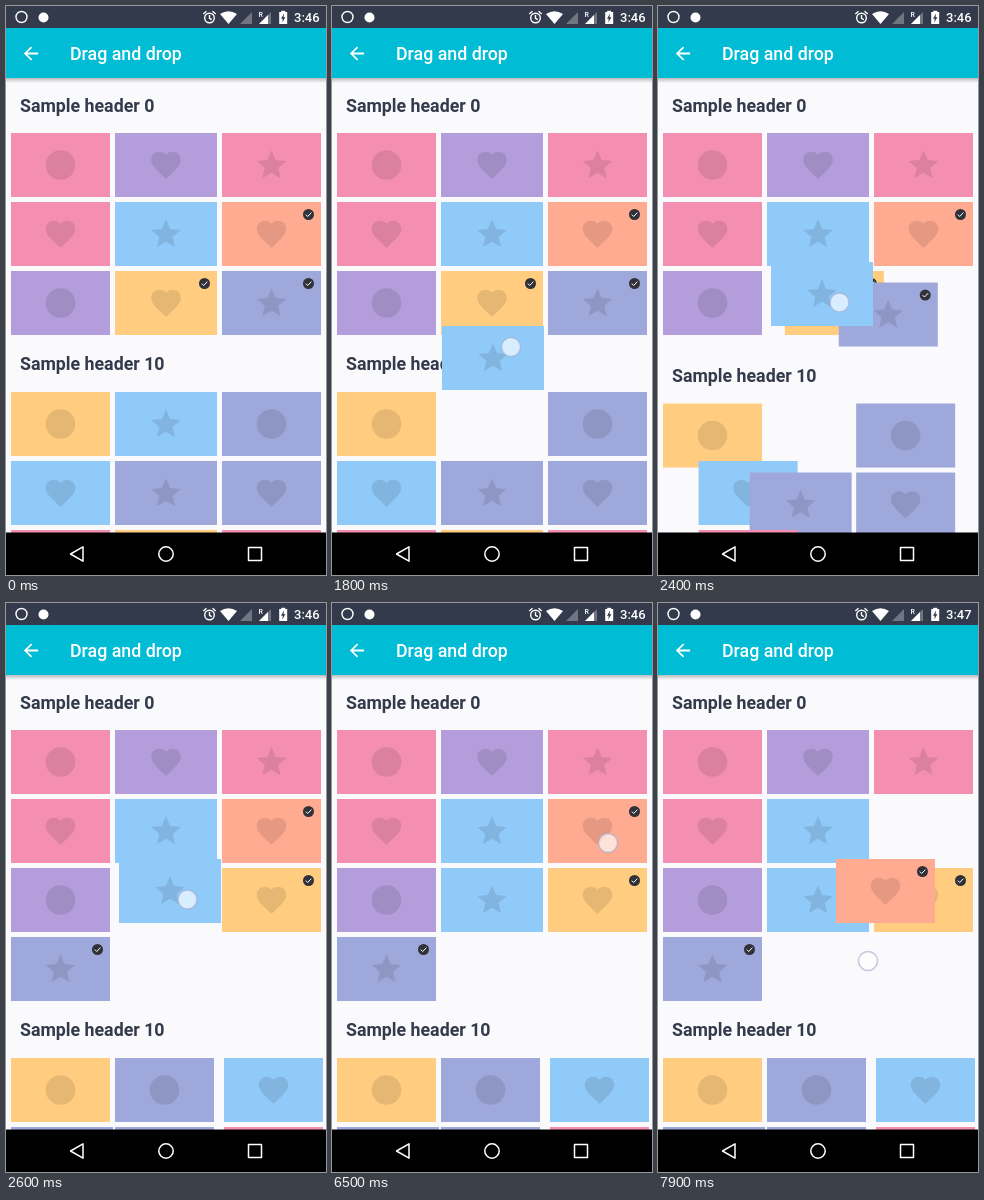
An HTML page with a canvas that plays this animation: 320 px wide and 569 px high, repeating every 8 s.

```html
<!DOCTYPE html>
<html lang="en">
<head>
<meta charset="utf-8">
<title>Drag and drop</title>
<style>
html, body { margin: 0; width: 100%; height: 100%; overflow: hidden; background: #000; }
canvas { display: block; width: 320px; height: 569px; }
</style>
</head>
<body>
<canvas id="stage"></canvas>
<script>
const W = 320, H = 569, LOOP = 8000, STEP = 100;
const canvas = document.getElementById('stage');
const ctx = canvas.getContext('2d');
const ratio = window.devicePixelRatio || 1;
canvas.width = W * ratio;
canvas.height = H * ratio;

const INK = '#333a4b', PAPER = '#faf9fc', BAR = '#00bcd4';
const COLORS = { p: '#f48fb1', v: '#b39ddb', b: '#90caf9', d: '#ffab91', o: '#ffcc80', i: '#9fa8da' };
const COLS = [5, 109, 216], WIDTHS = [99, 102, 99];
const ROW = 69, TILE_H = 64;

const heart = new Path2D('M12 21.35l-1.45-1.32C5.4 15.36 2 12.28 2 8.5 2 5.42 4.42 3 7.5 3c1.74 0 3.41.81 4.5 2.09C13.09 3.81 14.76 3 16.5 3 19.58 3 22 5.42 22 8.5c0 3.78-3.4 6.86-8.55 11.54z');
const star = new Path2D('M12 17.27L18.18 21l-1.64-7.03L22 9.24l-7.19-.61L12 2 9.19 8.63 2 9.24l5.46 4.73L5.82 21z');
const disc = new Path2D();
disc.arc(12, 12, 10, 0, Math.PI * 2);
const SHAPES = { h: heart, s: star, c: disc };
const backArrow = new Path2D('M20 11H7.83l5.59-5.59L12 4l-8 8 8 8 1.41-1.41L7.83 13H20z');

// Paths are lists of [time, x, y].
const touchA = [[500, 177, 425], [1100, 177, 425], [1200, 177, 416], [1300, 177, 406],
  [1700, 178.5, 360], [1800, 179, 341], [2000, 180, 317], [2300, 181.5, 296], [2400, 181.5, 296.5]];
const tileA = [[1100, 109, 386], [1200, 109, 384], [1300, 109, 376], [1800, 110, 320],
  [1900, 110.5, 303], [2100, 112, 278], [2400, 113, 256]];
const touchB = [[7100, 276, 240], [7400, 270, 252], [7600, 256, 276], [7700, 246, 292],
  [7800, 230, 320], [7900, 210, 358]];
const tileB = [[7100, 216, 196], [7400, 214, 200], [7600, 206, 213], [7800, 188, 240], [7900, 178, 256]];

const clamp = v => Math.max(0, Math.min(1, v));
const mix = (a, b, k) => a + (b - a) * k;
const smooth = v => (1 - Math.cos(Math.PI * clamp(v))) / 2;

function along(keys, t) {
  let n = keys.findIndex(k => k[0] > t);
  if (n < 0) return keys[keys.length - 1].slice(1);
  n = Math.max(1, n);
  const [a, b] = [keys[n - 1], keys[n]];
  const k = clamp((t - a[0]) / (b[0] - a[0]));
  return [mix(a[1], b[1], k), mix(a[2], b[2], k)];
}

const slot = (i, top, cols = COLS) => [cols[i % 3], top + ROW * Math.floor(i / 3)];

function makeTile(code, i, to, from, width) {
  return { color: COLORS[code[0]], shape: SHAPES[code[1]], checked: code[2] === '+', from, to, width };
}

const first = 'pc vh ps ph bs dh+ vc oh+ is+'.split(' ').map((code, i) => {
  const j = i < 7 ? i : i + 1;
  return makeTile(code, i, slot(j, 127), slot(i, 127), [WIDTHS[i % 3], WIDTHS[j % 3]]);
});
const second = 'oc bs ic bh is ih pc oc pc'.split(' ').map((code, i) => {
  const w = WIDTHS[i % 3];
  return makeTile(code, i, slot(i > 1 ? i - 1 : i, 455, [5, 109, 218]), slot(i, 386), [w, w]);
});
const moved = second[1];
moved.to = slot(7, 127);
const picked = first[5];

function circle(x, y, r) {
  ctx.beginPath();
  ctx.arc(x, y, r, 0, Math.PI * 2);
}

function line(points, close) {
  ctx.beginPath();
  points.forEach(([x, y]) => ctx.lineTo(x, y));
  if (close) ctx.closePath();
}

function icon(path, x, y, scale) {
  ctx.save();
  ctx.translate(x, y);
  ctx.scale(scale, scale);
  ctx.translate(-12, -12);
  ctx.fill(path);
  ctx.restore();
}

function text(str, x, y, font, color) {
  ctx.font = font + ' Roboto, sans-serif';
  ctx.fillStyle = color;
  ctx.fillText(str, x, y);
}

function drawTile(tile, x, y, w) {
  ctx.fillStyle = tile.color;
  ctx.fillRect(x, y, w, TILE_H);
  ctx.fillStyle = 'rgba(0,0,0,.1)';
  icon(tile.shape, x + w / 2, y + TILE_H / 2, 1.48);
  if (!tile.checked) return;
  const cx = x + w - 12.5, cy = y + 12.5;
  ctx.fillStyle = '#303139';
  circle(cx, cy, 5.5);
  ctx.fill();
  ctx.strokeStyle = '#fff';
  ctx.lineWidth = 1;
  line([[cx - 2.7, cy + .1], [cx - .8, cy + 2], [cx + 2.9, cy - 1.9]]);
  ctx.stroke();
}

function drawList(t) {
  const p = smooth((t - 2333) / 250);
  text('Sample header 0', 14, 105.5, 'bold 17.78px', INK);
  text('Sample header 10', 14, mix(364, 433, p), 'bold 17.78px', INK);
  for (const tile of [...first, ...second]) {
    if (tile === moved || (tile === picked && t >= 7100)) continue;
    drawTile(tile, mix(tile.from[0], tile.to[0], p), mix(tile.from[1], tile.to[1], p), tile.width[p > 0 ? 1 : 0]);
  }
  const [x, y] = along(tileA, t);
  const drop = smooth((t - 2850) / 250);
  drawTile(moved, mix(x, moved.to[0], drop), mix(y, moved.to[1], drop), 102);
  if (t >= 7100) drawTile(picked, ...along(tileB, t), 99);
}

function drawTouch(t) {
  const keys = t >= 6500 ? touchB : t >= 500 && t < 2900 ? touchA : null;
  if (!keys) return;
  circle(...along(keys, t), 9.5);
  ctx.fillStyle = 'rgba(255,255,255,.65)';
  ctx.fill();
  ctx.strokeStyle = 'rgba(165,172,212,.65)';
  ctx.lineWidth = 1.5;
  ctx.stroke();
}

function drawStatus(t) {
  ctx.fillStyle = INK;
  ctx.fillRect(0, 0, W, 22);
  ctx.strokeStyle = ctx.fillStyle = '#fff';
  ctx.lineWidth = 1.4;
  circle(15.5, 11, 5.5);
  ctx.stroke();
  circle(37.5, 11.5, 5);
  ctx.fill();

  // alarm
  circle(203.5, 12, 4.8);
  ctx.stroke();
  line([[203.5, 9], [203.5, 12.3], [205.8, 13.6]]);
  ctx.stroke();
  for (const s of [-1, 1]) {
    line([[203.5 + s * 3, 5.2], [203.5 + s * 6.2, 8]]);
    ctx.stroke();
  }

  // wifi
  ctx.beginPath();
  ctx.moveTo(222.5, 18);
  ctx.lineTo(214, 8);
  ctx.quadraticCurveTo(222.5, 2.5, 231, 8);
  ctx.fill();

  // signals
  ctx.fillStyle = 'rgba(255,255,255,.3)';
  line([[234, 18], [246, 18], [246, 6]], true);
  ctx.fill();
  line([[253, 18], [265, 18], [265, 6]], true);
  ctx.fill();
  ctx.fillStyle = '#fff';
  line([[253, 18], [262, 18], [262, 9]], true);
  ctx.fill();
  text('R', 252.5, 10.5, '500 7px', '#fff');

  // battery
  ctx.fillRect(275.2, 4.8, 4, 2);
  ctx.fillRect(273.2, 6, 8, 12);
  ctx.fillStyle = INK;
  line([[278, 7.5], [275, 12.7], [276.8, 12.7], [276.3, 16.5], [279.4, 11.3], [277.6, 11.3]], true);
  ctx.fill();
  text(t < 7500 ? '3:46' : '3:47', 288, 16, '500 13px', '#fff');
}

function drawChrome(t) {
  const shade = ctx.createLinearGradient(0, 72, 0, 77);
  shade.addColorStop(0, 'rgba(0,0,0,.25)');
  shade.addColorStop(1, 'rgba(0,0,0,0)');
  ctx.fillStyle = shade;
  ctx.fillRect(0, 72, W, 5);
  ctx.fillStyle = BAR;
  ctx.fillRect(0, 22, W, 50);
  ctx.fillStyle = '#fff';
  icon(backArrow, 25, 47.5, .889);
  text('Drag and drop', 64, 54, '500 17.78px', '#fff');
  drawStatus(t);

  ctx.fillStyle = '#000';
  ctx.fillRect(0, 526.5, W, H - 526.5);
  ctx.strokeStyle = '#fff';
  ctx.lineWidth = 1.5;
  ctx.lineJoin = 'round';
  line([[64.5, 548], [77, 540.8], [77, 555.2]], true);
  ctx.stroke();
  circle(160, 548, 7.2);
  ctx.stroke();
  ctx.strokeRect(242.5, 541.5, 13, 13);
}

const start = performance.now();

function frame() {
  const now = Math.max(0, performance.now() - start) % LOOP;
  const t = Math.floor(now / STEP) * STEP;
  ctx.setTransform(ratio, 0, 0, ratio, 0, 0);
  ctx.fillStyle = PAPER;
  ctx.fillRect(0, 0, W, H);
  drawList(t);
  drawTouch(t);
  drawChrome(t);
  requestAnimationFrame(frame);
}
frame();
</script>
</body>
</html>
```
